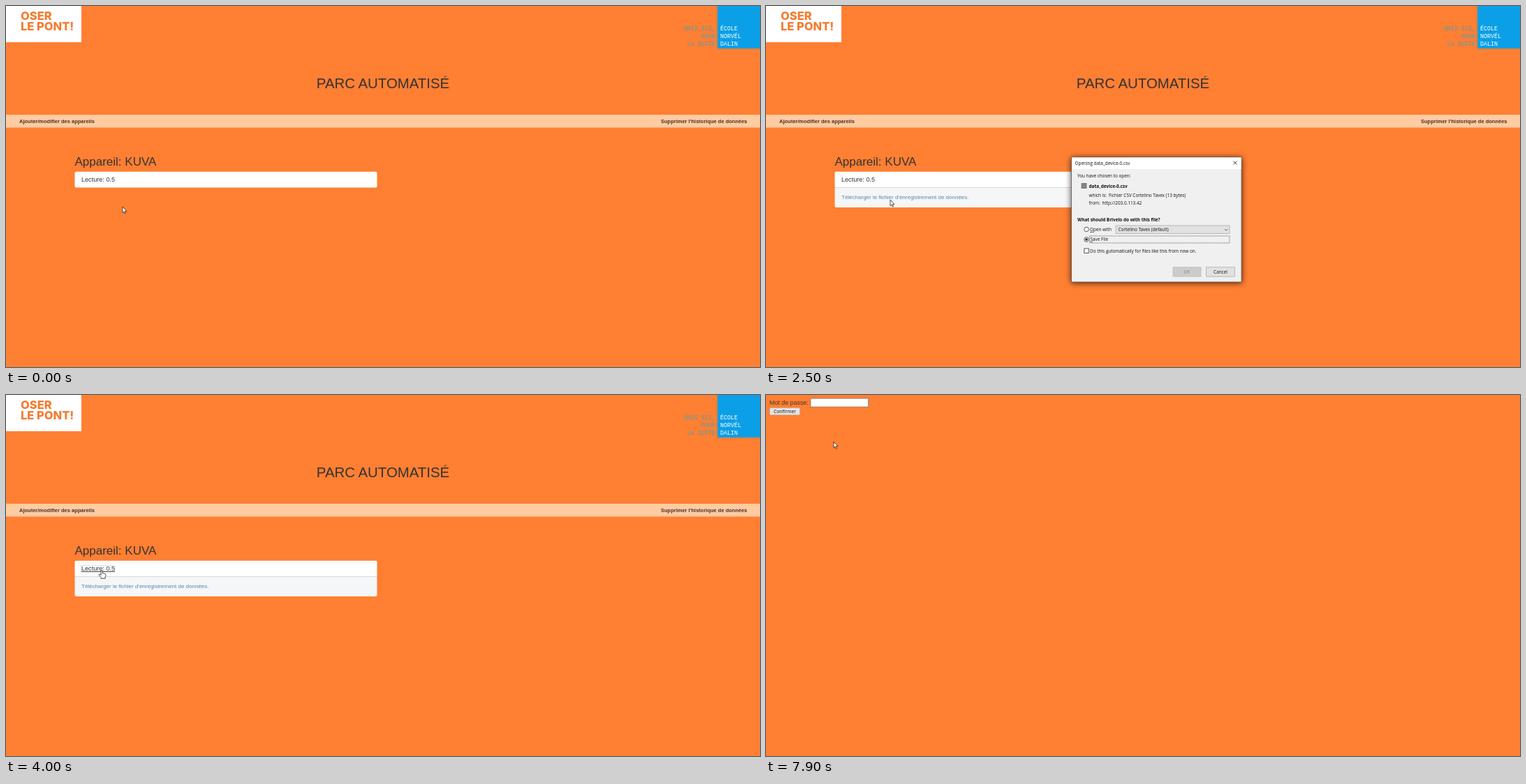
An HTML page that plays this animation: 1080 by 518 pixels, repeating every 8 s.

```html
<!DOCTYPE html>
<html lang="fr">
<head>
<meta charset="utf-8">
<title>Parc automatisé</title>
<style>
html, body { margin: 0; width: 100%; height: 100%; overflow: hidden; background: #ff7f33; }
svg { display: block; width: 100vw; height: 100vh; }
text { font-family: "Liberation Sans", Arial, sans-serif; fill: #333; white-space: pre; }
.menu { font-size: 7.5px; font-weight: 700; fill: #4d3023; }
.badge { font: 800 16.5px Inter, sans-serif; fill: #f47b30; }
.slogan { font: 8.4px "Liberation Mono", monospace; fill: #4d9fb4; text-anchor: end; }
.school { font: 8.4px "Liberation Mono", monospace; fill: #fff; }
.ui text { font: 6.4px "Open Sans", sans-serif; fill: #111; }
.ui .b { font-weight: 700; }
.ui .mid { text-anchor: middle; }
#dialog { filter: drop-shadow(0 1px 4px rgba(0, 0, 0, .75)); }
.under { text-decoration: underline; }
</style>
</head>
<body>
<svg viewBox="0 0 1080 518" preserveAspectRatio="none">
  <defs>
    <clipPath id="fold"><rect id="foldBox" x="98" y="260" width="435" height="29"/></clipPath>
  </defs>
  <rect width="1080" height="518" fill="#ff7f33"/>

  <g id="home">
    <rect y="-56" width="108" height="108" fill="#fff"/>
    <text class="badge" x="21" y="20">OSER</text>
    <text class="badge" x="21" y="34.5">LE PONT!</text>
    <rect x="1019" width="61" height="61" fill="#0a9fe6"/>
    <text class="slogan" x="1016" y="35">UNIS ICI,</text>
    <text class="slogan" x="1016" y="46">POUR</text>
    <text class="slogan" x="1016" y="57">LA SUITE</text>
    <text class="school" x="1023" y="35">ÉCOLE</text>
    <text class="school" x="1023" y="46">NORVÉL</text>
    <text class="school" x="1023" y="57">DALIN</text>

    <text x="540" y="118" font-size="20.4" text-anchor="middle">PARC AUTOMATISÉ</text>
    <rect y="156" width="1080" height="18.5" fill="#ffcba1"/>
    <text id="edit" class="menu" x="19" y="168">Ajouter/modifier des appareils</text>
    <text id="wipe" class="menu" x="1061.5" y="168" text-anchor="end">Supprimer l'historique de données</text>

    <text x="98.5" y="229" font-size="17">Appareil: KUVA</text>
    <rect id="panel" x="98.5" y="237.7" width="433" height="22.8" rx="2" fill="#fff"/>
    <g id="body" clip-path="url(#fold)">
      <path id="bodyFill" fill="#f5f6f7"/>
      <path d="M98.5 260.5H531.5" stroke="#d8d8d8"/>
      <text id="link" x="108" y="277" font-size="8">Télécharger le fichier d'enregistrement de données.</text>
    </g>
    <rect id="ring" x="107.5" y="244.5" width="48" height="9" fill="none" stroke="#999" stroke-width=".6" stroke-dasharray="1 1"/>
    <text id="reading" x="108" y="252" font-size="9.1">Lecture: 0.5</text>
  </g>

  <g id="login" class="ui">
    <text x="5" y="14" style="font:8.9px 'Liberation Sans',sans-serif;fill:#4a3628">Mot de passe:</text>
    <rect x="64" y="5" width="82.5" height="12" fill="#fff" stroke="#8a7a70" stroke-width=".8"/>
    <rect x="5.3" y="18.3" width="43" height="10.4" fill="#e6e4e2" stroke="#b5a9a0" stroke-width=".7"/>
    <text class="mid" x="27" y="26" style="font-size:6.75px">Confirmer</text>
  </g>

  <g id="dialog" class="ui">
    <rect x="437.5" y="217" width="243.5" height="179" fill="#f0f0f0" stroke="#6b5a50" stroke-width=".8"/>
    <rect x="438" y="217.4" width="242.6" height="16.6" fill="#fff"/>
    <text x="442.5" y="228">Opening data_device-0.csv</text>
    <path d="M669.5 222.5l5 5m0-5l-5 5" stroke="#222" stroke-width=".8"/>
    <text x="446" y="246.3">You have chosen to open:</text>
    <rect x="451.5" y="254" width="8" height="8" fill="#7d8387"/>
    <text class="b" x="462.5" y="261">data_device-0.csv</text>
    <text x="462.5" y="274">which is:</text>
    <text x="491" y="274">Fichier CSV Cortelino Tavex (13 bytes)</text>
    <text x="462.5" y="284.5">from:</text>
    <text x="481.5" y="284.5">http://203.0.113.42</text>
    <text class="b" x="446" y="308.7">What should Brivelo do with this file?</text>
    <g fill="#fff" stroke="#333" stroke-width=".8">
      <circle cx="459" cy="320.5" r="3.3"/>
      <circle cx="459" cy="335" r="3.3"/>
      <rect x="455.8" y="348" width="6.4" height="6.4"/>
    </g>
    <circle cx="459" cy="335" r="1.8" fill="#222"/>
    <text x="464" y="323"><tspan class="under">O</tspan>pen with</text>
    <rect x="501" y="315" width="163" height="11.5" fill="#e1e1e1" stroke="#adadad" stroke-width=".8"/>
    <text x="504.5" y="323">Cortelino Tavex (default)</text>
    <path d="M657 320l2.2 2.2 2.2-2.2" fill="none" stroke="#444" stroke-width=".8"/>
    <rect x="463.5" y="330" width="200.5" height="10" fill="none" stroke="#555" stroke-width=".8" stroke-dasharray="1 .7"/>
    <text x="464.5" y="337.3"><tspan class="under">S</tspan>ave File</text>
    <text x="464" y="353.7">Do this <tspan class="under">a</tspan>utomatically for files like this from now on.</text>
    <rect x="583" y="374.8" width="40" height="13.4" fill="#ccc" stroke="#bfbfbf" stroke-width=".8"/>
    <text class="mid" x="603" y="384" style="fill:#888">OK</text>
    <rect x="630.5" y="374.8" width="41" height="13.4" fill="#e1e1e1" stroke="#adadad" stroke-width=".8"/>
    <text class="mid" x="651" y="384">Cancel</text>
  </g>

  <g id="pointer" fill="#fff" stroke="#222" stroke-width=".8" stroke-linejoin="round">
    <path id="arrow" d="M0 0V8.6L1.9 7L3.2 10L4.6 9.4L3.3 6.5H5.8Z"/>
    <path id="hand" d="M-1 1Q0 -.6 1 1V4.6L5 5.5Q6.3 6 6 7.5L5.2 10V12.2H-1V10.5L-4 7.2Q-4 5.6 -2.6 6.2L-1 7.6Z"/>
  </g>
</svg>
<script>
const LOOP = 8000, STEP = 100;
const OPEN = 800, CLOSE = 4300, FOLD_TIME = 350;
const DIALOG_ON = 2500, DIALOG_OFF = 3600, LOGIN_ON = 7600;

// Pointer stops: time, x, y
const stops = [
  [0, 167, 288], [500, 134, 249], [1000, 134, 249], [1500, 175, 277],
  [2200, 178, 278], [2500, 178, 278], [3000, 401, 359.5], [3300, 648, 377],
  [3500, 648, 377], [4000, 137, 251], [4300, 137, 251], [4800, 501, 319],
  [5100, 505, 324], [5700, 985, 165], [6100, 985, 165], [6700, 267, 122],
  [6900, 228, 127], [7300, 75, 163], [7600, 75, 163], [7800, 77, 119], [7900, 97, 67]
];

const $ = id => document.getElementById(id);
const ease = p => p * p * (3 - 2 * p);
const progress = (t, from, span) => ease(Math.min(1, Math.max(0, (t - from) / span)));
const show = (id, on) => { $(id).style.display = on ? "" : "none"; };
const underline = (id, on) => $(id).classList.toggle("under", on);

function pointerAt(t) {
  const i = stops.findIndex(s => s[0] > t);
  if (i < 0) return stops[stops.length - 1].slice(1);
  const [t0, x0, y0] = stops[i - 1], [t1, x1, y1] = stops[i];
  const p = ease((t - t0) / (t1 - t0));
  return [x0 + (x1 - x0) * p, y0 + (y1 - y0) * p];
}

function draw(t) {
  const [x, y] = pointerAt(t);
  const login = t >= LOGIN_ON;
  const dialog = t >= DIALOG_ON && t < DIALOG_OFF;
  const inside = (l, top, r, b) => !login && !dialog && x >= l && x <= r && y >= top && y <= b;
  const fold = 28.5 * (progress(t, OPEN, FOLD_TIME) - progress(t, CLOSE, FOLD_TIME));

  show("home", !login);
  show("login", login);
  show("dialog", dialog);

  show("body", fold > 0.2);
  $("foldBox").setAttribute("height", fold + 0.5);
  const drop = Math.max(0, fold - 2);
  $("bodyFill").setAttribute("d",
    `M98.5 260.5H531.5v${drop}q0 2 -2 2H100.5q-2 0 -2 -2Z`);

  const onReading = inside(108, 243, 156, 255);
  const onLink = fold > 20 && inside(108, 269, 291, 281);
  const onEdit = inside(19, 158, 128, 173);
  const onWipe = inside(938, 158, 1062, 173);
  const focus = (t >= 700 && t < 2400) || t >= DIALOG_OFF;

  show("ring", focus);
  underline("reading", focus || onReading);
  underline("link", onLink);
  underline("edit", onEdit);
  underline("wipe", onWipe);
  $("link").style.fill = onLink ? "#31608a" : "#5585ad";

  const hand = onReading || onLink || onEdit || onWipe;
  show("hand", hand);
  show("arrow", !hand);
  $("pointer").setAttribute("transform", `translate(${x} ${y})`);
}

const start = performance.now();
function tick() {
  const t = (performance.now() - start) % LOOP;
  draw(Math.floor(t / STEP) * STEP);
  requestAnimationFrame(tick);
}
tick();
</script>
</body>
</html>
```
